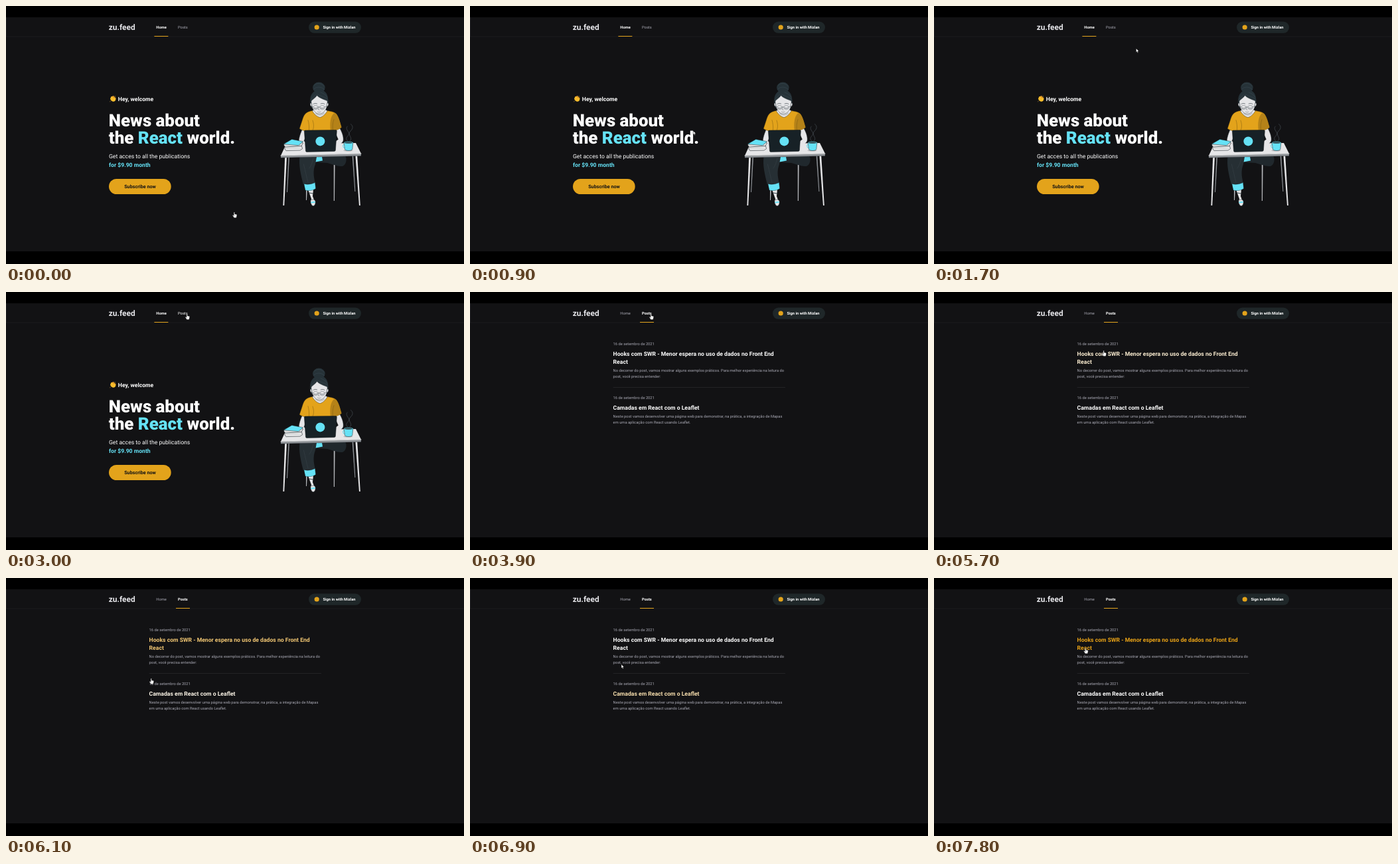
These frames come from a looping animation (690x388 px, 8 s). An HTML page with a canvas:

```html
<!DOCTYPE html>
<html lang="pt">
<head>
<meta charset="utf-8">
<title>News about the React world</title>
<style>
html, body { margin: 0; width: 100%; height: 100%; overflow: hidden; background: #000; }
canvas { display: block; width: 690px; height: 388px; }
</style>
</head>
<body>
<canvas id="stage"></canvas>
<script>
const W = 690, H = 388, LOOP = 8000, STEP = 100, PAGE_SWITCH = 3900;
const ORANGE = '#e3a31b', CYAN = '#65e2f6', GREY = '#a8a8b3', WHITE = '#ffffff';
const DARK = '#263238', SKIN = '#e6e6e8', LINE = '#1b2429';

const canvas = document.getElementById('stage');
const ctx = canvas.getContext('2d');
const dpr = window.devicePixelRatio || 1;
canvas.width = Math.round(W * dpr);
canvas.height = Math.round(H * dpr);

function text(str, x, y, size, color, weight = 400) {
  ctx.font = `${weight} ${size}px Roboto, sans-serif`;
  ctx.fillStyle = color;
  ctx.fillText(str, x, y);
  return x + ctx.measureText(str).width;
}

function rect(x, y, w, h, color) {
  ctx.fillStyle = color;
  ctx.fillRect(x, y, w, h);
}

function shape(d, fill, stroke, width = 0.5) {
  const path = new Path2D(d);
  if (fill) { ctx.fillStyle = fill; ctx.fill(path); }
  if (stroke) { ctx.strokeStyle = stroke; ctx.lineWidth = width; ctx.stroke(path); }
}

function ellipse(x, y, rx, ry, fill, stroke, width = 0.5) {
  ctx.beginPath();
  ctx.ellipse(x, y, rx, ry, 0, 0, 7);
  if (fill) { ctx.fillStyle = fill; ctx.fill(); }
  if (stroke) { ctx.strokeStyle = stroke; ctx.lineWidth = width; ctx.stroke(); }
}

function pill(x, y, w, h, color) {
  ctx.beginPath();
  ctx.roundRect(x, y, w, h, h / 2);
  ctx.fillStyle = color;
  ctx.fill();
}

// Cursor path: time, x, y of the tip
const PATH = [
  [0, 344, 310], [200, 344, 310], [1100, 334, 153], [1700, 304.5, 64], [2000, 285, 44],
  [2200, 272.8, 33], [3900, 272.8, 33], [4700, 278.5, 69], [5500, 278.5, 69],
  [5750, 250, 93], [5900, 224, 119], [6000, 217, 137], [6100, 218.8, 151],
  [6300, 227, 172], [6400, 227, 172], [6900, 228, 130], [7200, 228.3, 105.3], [LOOP, 228.3, 105.3]
];
const HAND = [[0, 300], [2100, 4000], [5700, 5950], [6100, 6800], [7000, LOOP]];
const HOVER_FIRST = [[5660, 6020], [6970, LOOP]];
const HOVER_SECOND = [[6080, 6770]];

const clamp = v => Math.max(0, Math.min(1, v));
const within = (spans, t) => spans.some(([a, b]) => t >= a && t < b);

function cursorAt(t) {
  const i = PATH.findIndex(p => p[0] > t);
  const [t0, x0, y0] = PATH[i - 1], [t1, x1, y1] = PATH[i];
  const k = (t - t0) / (t1 - t0);
  return [x0 + (x1 - x0) * k, y0 + (y1 - y0) * k];
}

function hoverColor(spans, t) {
  const k = Math.max(...spans.map(([a, b]) => Math.min(clamp((t - a) / 200), 1 - clamp((t - b) / 200))));
  const mix = c => Math.round(255 + (c - 255) * k);
  return `rgb(${mix(235)},${mix(164)},${mix(23)})`;
}

function header(t) {
  const onPosts = t >= PAGE_SWITCH;
  rect(0, 45.7, W, 0.7, '#202023');
  rect(0, 17, 0.6, 29, '#242428');
  text('zu.feed', 154.8, 35.6, 11.9, '#e6e6ea', 700);
  text('Home', 226.3, 34, 5.77, onPosts ? GREY : WHITE, onPosts ? 400 : 700);
  text('Posts', 259, 34, 5.77, t >= 2100 ? WHITE : GREY, onPosts ? 700 : 400);
  rect(onPosts ? 256 : 223.4, 45, 21, 1, ORANGE);
  pill(456, 23.4, 79, 17.3, '#1f2729');
  ellipse(468.2, 32, 3.6, 3.6, ORANGE);
  text('Sign in with Mizlan', 477.5, 34, 5.77, WHITE, 700);
}

function clap() {
  ctx.lineCap = 'round';
  shape('M159.2 136.8L163.2 139.4M161 136L164.6 139', null, '#e79a24', 1.7);
  shape('M158 137.6C156.4 138.6 157.2 142 159.8 143.2C162.4 144.4 165 143.2 165.3 140.8C165.5 139 164.9 137.4 164 137.6C163.4 138 164 139.2 163.4 139.4L159.9 136.3C158.9 135.6 158.2 136.6 158 137.6Z', '#fbc02d');
  shape('M158.2 139.6L161 141.8M159 138L162 140.6', null, '#e79a24', 0.4);
  shape('M162.5 135.2L162.9 136.2M164.5 135.6L164.1 136.5M157.2 143L156.6 143.9', null, '#e8b34a', 0.5);
}

function tableLegs() {
  shape('M493.8 238L495.6 238L495 293L493.8 293ZM452 276L453.8 276L453 292L452 292Z', '#b4b6ba');
  shape('M420.2 227L423 227L419.2 300L417.4 300Z', SKIN);
  shape('M425.4 227L427 227L424 280L423 280Z', '#8f9398');
  shape('M526.4 225L529.2 225L533.8 300L532 300Z', SKIN);
  shape('M521.6 225L523.2 225L526.4 279L525.4 279Z', '#8f9398');
}

function legs() {
  // far leg folded under the seat
  shape('M468 227L511 225C513.5 229 513.5 237 508 240.5C502 242.5 492 238 484 236L467 235Z', '#20282d');
  shape('M463 227L476 226.5L477 232.5L464 235Z', CYAN);
  shape('M455 276L463 276L462 286L464.6 293L464.6 297L459 297L460 290Z', SKIN);
  shape('M458.8 292.5C461 290.4 464.6 290.6 466 293.2C466.6 297 465.6 300 463 300.8C460.2 300.6 459 297 458.8 292.5Z', SKIN, LINE);
  shape('M459.4 294.4L465.8 293.8L465.6 295.8L459.6 296.4Z', CYAN);
  shape('M457 281L463 282.2', null, DARK, 0.9);
  shape('M442.5 227C440.6 240 444.6 255 447.8 268L466 267.4C463.6 257 462 248 466 238L468 227Z', '#262f34');
  shape('M448.4 238C451 248 453 258 455 265M463 229C461 236 460 240 457 244', null, '#3b444a', 0.5);
  shape('M449 267.4C454 269 461 267.8 465.6 265.4L466.6 274.6C463 277.6 456 278.4 451 277Z', CYAN, LINE, 0.4);
}

function woman() {
  // bun and hair
  ellipse(471.4, 122.8, 9.3, 8.2, DARK);
  shape('M464 119.4C468 115 475 115.4 479 120.4M463.6 125C469 120.4 475 121.4 479.4 125.4', null, '#42525b', 0.4);
  shape('M471.5 126C463.6 126.4 458.6 133 458.2 141C458 146 458.4 150 460 153L483 153C485.4 150 486 146 485.4 141C484.8 131 480 126 471.5 126Z', DARK);

  // arms
  shape('M446 186C442.6 194 440.4 201 441.4 206.6C443.6 210.6 450 214 456 215L457 208L449 203L455.4 187Z', SKIN, LINE);
  shape('M503 184C507 191 509 198 508 203C506 207.4 500 210.6 493 212.6L493 206L500.4 200.6L494 186Z', SKIN, LINE);

  // shirt with a shaded sleeve
  shape('M461 157.4C453 159 449.6 162 447.2 169C445.4 175 443.6 180 442.2 184.4C447 187.6 452 188.6 456.4 188L457 192L492 192L492.6 187.4C497.6 187 502 185.4 505.4 182.4C503 174 501 166 497.4 162C494.6 159.4 490 158.6 484.4 157.6Z', ORANGE, '#4f3b0f', 0.4);
  shape('M493.6 161.6C488.6 167 487.4 177 489 188L492.6 187.4C497.6 187 502 185.4 505.4 182.4C503 174 501 166 497.4 162C496.2 161.2 495 161 493.6 161.6Z', '#b58218');
  shape('M456.4 188C457 181 456.4 176 455 171.6M492.6 187.4C491.6 181 492.2 176 494 170.6M462 172C464 178 464 183 462 187', null, '#7d5a10', 0.5);

  // open neckline, neck and face
  shape('M461.4 157.6L466 154.4L479.4 154.4L484.2 157.8C481 163 477 166.6 473 167.6C468.6 166.6 464 162.6 461.4 157.6Z', SKIN, LINE, 0.4);
  shape('M466.4 159.8C470 164 475.6 164 479.4 159.6L479.8 161.6C476 166 469.4 165.6 466.4 162Z', '#bfc1c5');
  shape('M460 142.6C463 140 467 137 468.6 134.6C472 138.8 479 140.4 484 142.8C484.8 150 482.4 156.6 477.8 160.2C474 163 469 162.8 466 159.8C461.8 155.8 459.4 149 460 142.6Z', SKIN, LINE, 0.4);
  shape('M460 146C457.4 145.4 457.8 150.8 460.8 151.4ZM484 146C486.8 145.4 486.2 150.8 483 151.4Z', SKIN, LINE, 0.4);
  shape('M469 133C474 135.6 480 136.6 484 139.6M467 133C464 136 461 138 459.6 140.6M474 130C478 131 482 134 484 137', null, '#42525b', 0.4);
  ellipse(466.4, 152.6, 3.7, 3.1, null, '#5a6368', 0.5);
  ellipse(476.6, 152.6, 3.7, 3.1, null, '#5a6368', 0.5);
  shape('M470.1 152.2C470.8 151.6 472 151.6 472.9 152.2M462.6 151.8L460.6 150.6M480.3 151.8L483.2 150.6', null, '#5a6368', 0.5);
  shape('M464 153.2C465.4 154.2 467.4 154.2 468.6 153.2M474.2 153.2C475.6 154.2 477.4 154.2 478.6 153.2M463 147.4C464.6 146.2 467 146.2 468.6 147M474.2 147C476 146.2 478.4 146.2 480 147.4', null, DARK, 0.6);
  shape('M471.4 151L470.6 156L472.2 156.2M469.4 159C470.8 160 472.6 160 474 159', null, '#5a6064', 0.5);
}

function desk() {
  shape('M422 207.6L527 206L535 222L414 225Z', SKIN);
  shape('M414 225L535 222L535 225.4L414 228.2Z', '#8e9296', LINE, 0.3);
  shape('M414 225L535 222', null, WHITE, 0.7);
}

function books() {
  shape('M420.6 211L444.8 208.6L446.6 214.6L443 217L421.8 217.6C419.6 215.6 419.6 212.6 420.6 211Z', '#f0f0f1', LINE, 0.6);
  shape('M421.6 213.4L445 211.6M421.6 215.4L444.4 214', null, '#8c9296', 0.4);
  shape('M419 207.4L444.6 204.8L447.6 206L445 210.4L421 212C418.6 210.6 418.4 208.8 419 207.4Z', '#f0f0f1', LINE, 0.6);
  shape('M418.4 207.6L430.6 200.4L447.6 203.8L441 209.4Z', CYAN, LINE, 0.5);
  shape('M420.4 209.4L441 210.8L446.6 206', null, '#8c9296', 0.4);
}

function laptop() {
  shape('M449.4 188.6C449.2 187.4 450 187 451 187L496.6 186.6C497.8 186.6 498.4 187.2 498.3 188.4L496.4 216.6C496.2 218 495.6 218.5 494.4 218.5L453.2 219.4C452 219.4 451.6 218.8 451.5 217.8Z', '#172126', '#101619', 0.5);
  ellipse(473.4, 203.4, 7, 7, CYAN);
}

function mug() {
  ellipse(515.4, 217.2, 7, 1.4, '#b7b9bd');
  shape('M510.4 208C506.6 207.6 506.8 213.8 511 213.4', null, CYAN, 1.1);
  shape('M509.4 205.6L522.8 205.6L521.8 215.6C520.8 218.2 511.6 218.2 510.6 215.8Z', CYAN, LINE, 0.5);
  ellipse(516.1, 205.6, 6.7, 1.5, '#34444b', CYAN, 0.6);
  shape('M514.6 203C508 197 520 195 516 189.6C513 185.6 512 183 514.4 181M518 203C524 198 513 194 519 188C523.6 184 522.6 180 519.4 177.6', null, '#59636a', 0.5);
}

function homePage() {
  clap();
  text('Hey, welcome', 168.8, 142.6, 8.65, WHITE, 700);
  text('News about', 154.8, 181, 25.9, WHITE, 900);
  let x = text('the ', 154.8, 207, 25.9, WHITE, 900);
  x = text('React', x, 207, 25.9, CYAN, 900);
  text(' world.', x, 207, 25.9, WHITE, 900);
  text('Get acces to all the publications', 155, 229, 8.65, WHITE);
  text('for $9.90 month', 155, 242, 8.65, CYAN, 700);
  pill(155, 260, 93.7, 23, ORANGE);
  text('Subscribe now', 178.2, 274, 7.2, '#121214', 700);
  [tableLegs, legs, woman, desk, books, laptop, mug].forEach(part => part());
}

function post(top, title, body, color) {
  text('16 de setembro de 2021', 215.6, top + 5.4, 5.77, GREY);
  title.forEach((line, i) => text(line, 215.6, top + 21.5 + i * 11.5, 8.65, color, 700));
  const y = top + 33.8 + (title.length - 1) * 11.5;
  body.forEach((line, i) => text(line, 215.6, y + i * 9.37, 5.77, GREY));
}

function postsPage(t) {
  post(74.6,
    ['Hooks com SWR - Menor espera no uso de dados no Front End', 'React'],
    ['No decorrer do post, vamos mostrar alguns exemplos práticos. Para melhor experiência na leitura do',
     'post, você precisa entender:'],
    hoverColor(HOVER_FIRST, t));
  rect(215.6, 143.2, 259.4, 0.5, '#323237');
  post(155.2,
    ['Camadas em React com o Leaflet'],
    ['Neste post vamos desenvolver uma página web para demonstrar, na prática, a integração de Mapas',
     'em uma aplicação com React usando Leaflet.'],
    hoverColor(HOVER_SECOND, t));
}

function cursor(t) {
  const [x, y] = cursorAt(t);
  ctx.save();
  ctx.translate(x, y);
  ctx.lineJoin = 'round';
  if (within(HAND, t)) {
    shape('M-.8 .6C-.8 -.3 .6 -.3 .6 .6L.6 2.9L2.9 3.3C3.6 3.5 4 3.9 3.9 4.6L3.4 7.1L2.9 8.4L-.4 8.4L-2.5 5.3C-2.9 4.5 -2 4 -1.5 4.5L-.8 5.2Z', WHITE, '#111', 0.4);
  } else {
    shape('M0 0L0 5.6L1.3 4.4L2.2 6.4L3.2 6L2.3 4L4 3.9Z', WHITE, '#111', 0.4);
  }
  ctx.restore();
}

function draw(t) {
  ctx.setTransform(dpr, 0, 0, dpr, 0, 0);
  ctx.textRendering = 'geometricPrecision';
  rect(0, 0, W, H, '#000');
  rect(0, 17, W, 352, '#121214');
  header(t);
  if (t < PAGE_SWITCH) homePage();
  else postsPage(t);
  cursor(t);
}

const start = performance.now();
function tick() {
  const t = Math.max(0, performance.now() - start) % LOOP;
  draw(Math.floor(t / STEP) * STEP);
  requestAnimationFrame(tick);
}
tick();
</script>
</body>
</html>
```
